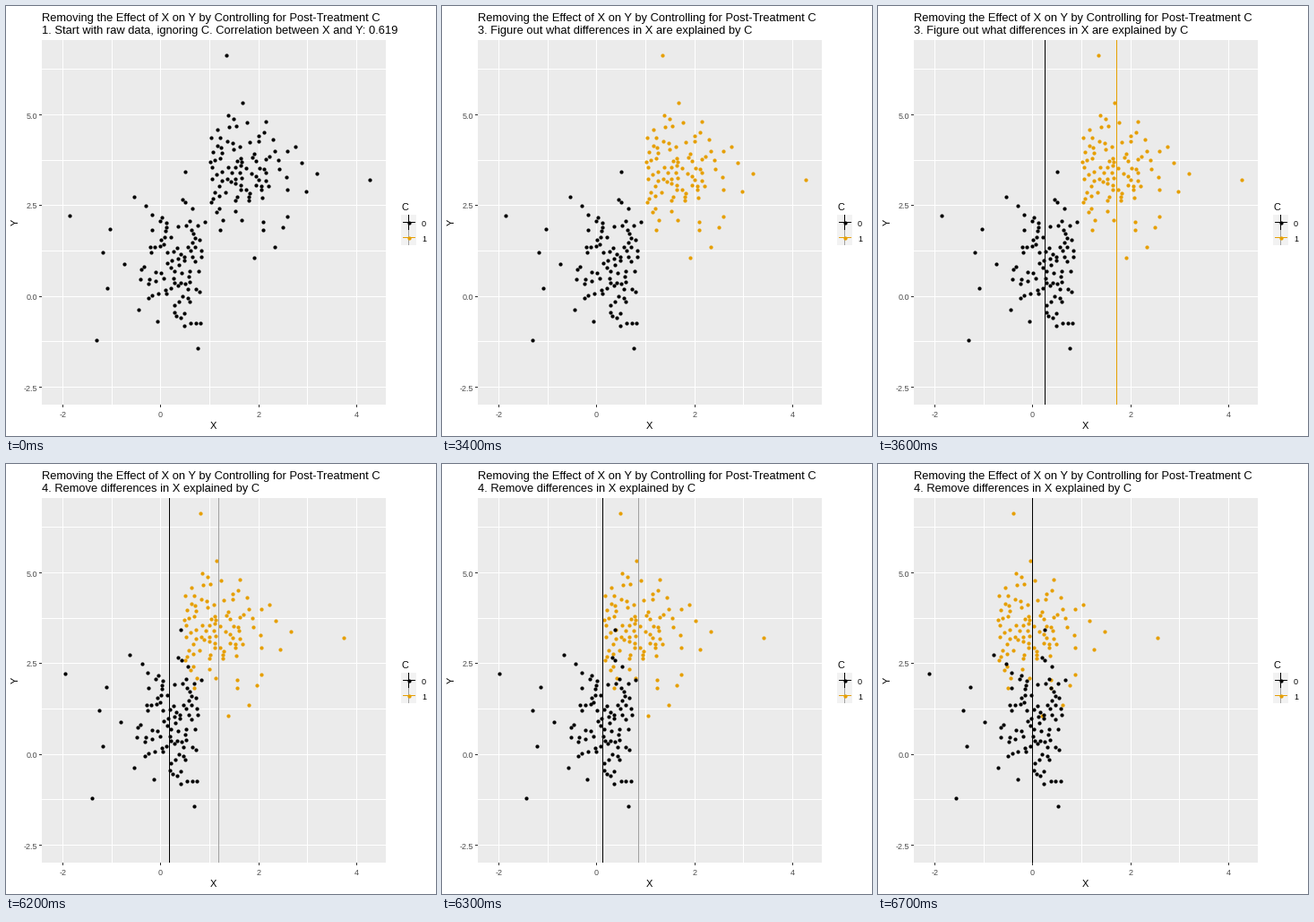
A matplotlib script that plays this animation: 480x480 px, repeating every 8000 ms.

```python
import math
import random

import matplotlib.pyplot as plt
from matplotlib.animation import FuncAnimation
from matplotlib.patches import Rectangle

SIZE, DPI = 480, 72
STEP, FRAMES = 100, 80
BLACK, ORANGE, GRAY = "#000000", "#E69F00", "#A0A0A0"
LEFT, TOP, WIDTH, HEIGHT = 40, 38, 384, 407
MEANS = 0.25, 1.72
TITLE = 12.87

plt.rcParams["font.family"] = "Liberation Sans"
fig = plt.figure(figsize=(SIZE / DPI, SIZE / DPI), dpi=DPI, facecolor="white")
ax = fig.add_axes([0, 0, 1, 1])
ax.set_xlim(0, SIZE)
ax.set_ylim(SIZE, 0)
ax.axis("off")


def px(x):
    return 172.25 + 54.7 * x


def py(y):
    return 323.6 - 40.52 * y


def box(x, y, w, h, color, z=1):
    return ax.add_patch(Rectangle((x, y), w, h, fc=color, ec="none", lw=0,
                                  antialiased=False, zorder=z))


def label(x, y, text, size, color=BLACK, **kw):
    return ax.text(x, y, text, fontsize=size, color=color, zorder=6, **kw)


def dots(xs, ys, color, z):
    return ax.plot(xs, ys, "o", ms=4.2, mew=0, color=color, zorder=z)[0]


# panel, grid and axes; every second grid line carries a tick
box(LEFT, TOP, WIDTH, HEIGHT, "#EBEBEB", 0)
for x in range(-2, 5):
    col = round(px(x))
    box(col, TOP, 1, HEIGHT, "white")
    if x % 2 == 0:
        box(col, TOP + HEIGHT, 1, 3, "#333333")
        label(col + 0.5, 459, f"{x}", 9, "#4D4D4D", ha="center")
for i in range(-2, 6):
    y = 1.25 * i
    row = round(py(y))
    box(LEFT, row, WIDTH, 1, "white")
    if i % 2 == 0:
        box(LEFT - 3, row, 3, 1, "#333333")
        label(35, row + 4.5, f"{y:.1f}", 9, "#4D4D4D", ha="right")
label(231.5, 472.5, "X", 11, ha="center")
label(16, 241.5, "Y", 11, rotation=90, ha="right", va="center")

# legend
label(441, 228, "C", 11)
for y, name, color, stem in ((233, "0", BLACK, BLACK), (250, "1", ORANGE, GRAY)):
    box(441, y, 17, 17, "#F2F2F2")
    box(449, y, 1, 17, stem, 2)
    box(443, y + 8, 14, 1, color, 2)
    dots([449.5], [y + 8.5], color, 3)
    label(464, y + 13, name, 9)

# data: a few outliers plus a random cloud for each value of C
rng = random.Random(21)
OUTLIERS_0 = [(-1.86, 2.22), (-1.31, -1.23), (-1.17, 1.19), (-1.09, 0.22),
              (-1.02, 1.85), (-0.73, 0.87), (-0.54, 2.74), (-0.45, -0.37),
              (0.50, 3.43), (0.77, -1.45)]
OUTLIERS_1 = [(1.34, 6.62), (1.67, 5.33), (1.92, 1.04), (2.33, 1.34),
              (2.75, 4.12), (2.89, 3.66), (2.97, 2.87), (3.19, 3.36),
              (4.28, 3.19)]


def cloud(points, total, draw, low, high, gap=0.09):
    """Add random points within low..high, kept apart, up to the total."""
    points = list(points)
    while len(points) < total:
        x, y = draw()
        if low < y < high and all(math.dist((x, y), q) > gap for q in points):
            points.append((x, y))
    return [px(x) for x, _ in points], [py(y) for _, y in points]


def draw_0():
    return rng.triangular(-0.5, 0.98, 0.6), rng.gauss(1.15, 1.0)


def draw_1():
    return min(1.02 + abs(rng.gauss(0, 0.75)), 2.6), rng.gauss(3.5, 0.8)


start_0, ys_0 = cloud(OUTLIERS_0, 100, draw_0, -0.9, 2.75)
start_1, ys_1 = cloud(OUTLIERS_1, 100, draw_1, 1.6, 5.2)
group_1 = dots(start_1, ys_1, ORANGE, 3)
group_0 = dots(start_0, ys_0, BLACK, 4)
line_1 = box(0, TOP, 1, HEIGHT, ORANGE, 5)
line_0 = box(0, TOP, 1, HEIGHT, BLACK, 5)

label(40, 17, "Removing the Effect of X on Y by Controlling for Post-Treatment C", TITLE)
caption = label(40, 31, "", TITLE)
STAGES = (
    (0, "1. Start with raw data, ignoring C. Correlation between X and Y: 0.619"),
    (500, "2. Separate data by the values of C."),
    (3400, "3. Figure out what differences in X are explained by C"),
    (6000, "4. Remove differences in X explained by C"))


def update(frame):
    t = frame * STEP
    caption.set_text([text for begin, text in STAGES if t >= begin][-1])
    group_1.set_color(BLACK if t < 500 else ORANGE)

    # sine ease in eight steps brings both means to zero
    k = min(max((t - 5900) / 800, 0), 1)
    left = (1 + math.cos(math.pi * k)) / 2
    for group, start, line, mean in zip((group_0, group_1), (start_0, start_1),
                                        (line_0, line_1), MEANS):
        shift = px(mean * left) - px(mean)
        group.set_xdata([x + shift for x in start])
        line.set_x(round(px(mean * left)))
        line.set_visible(t >= 3600)
    line_1.set_facecolor(GRAY if k > 0 else ORANGE)
    return group_0, group_1, line_0, line_1, caption


anim = FuncAnimation(fig, update, frames=FRAMES, interval=STEP,
                     repeat=True, repeat_delay=0, blit=False)
plt.show()
```
